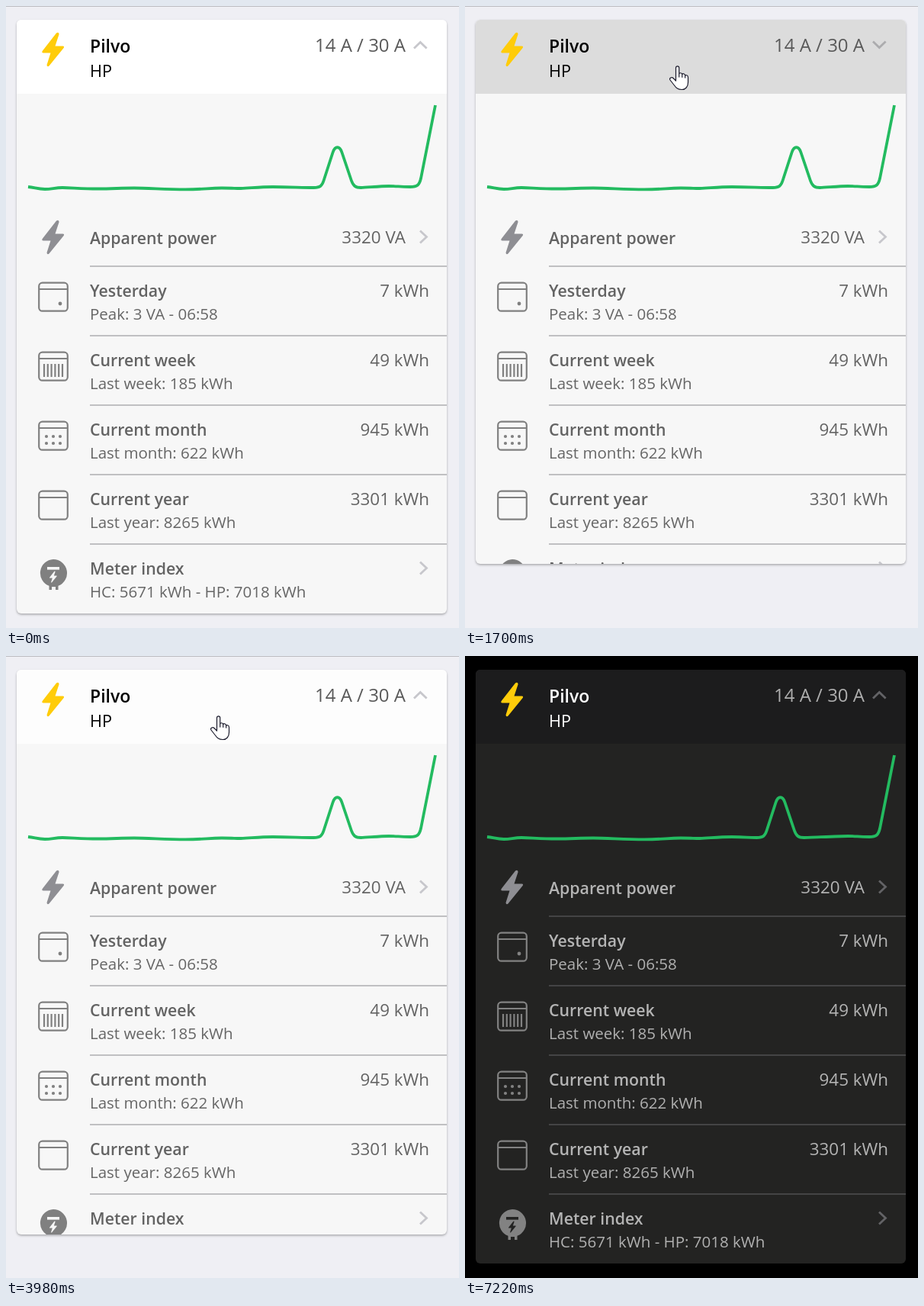
Write an HTML page that moves like this. It is 594x815 px and loops after 8 s.

```html
<!DOCTYPE html>
<html lang="en">
<head>
<meta charset="utf-8">
<title>Energy meter card</title>
<style>
  html, body { margin: 0; width: 100%; height: 100%; overflow: hidden; }
  body {
    --page: #efeff4; --edge: #bdbdc1; --head: #fff; --body: #f7f7f7;
    --strong: #000; --value: #595959; --text: #636363; --sub: #666;
    --rule: #c0c0c2; --icon: #808080; --bolt: #8e8e93; --chev: #c7c7cc;
    background: var(--page);
  }
  body.dark {
    --page: #000; --edge: #000; --head: #1c1c1d; --body: #232322;
    --strong: #fff; --value: #aeaeae; --text: #b4b4b4; --sub: #b0b0b0;
    --rule: #444445; --icon: #828282; --chev: #636366;
  }
  #stage { position: relative; width: 594px; height: 815px; overflow: hidden; background: var(--page); }
  #stage::before { content: ""; position: absolute; width: 100%; height: 1px; background: var(--edge); }
  #card {
    position: absolute; left: 14px; top: 18px; width: 564px; height: 778px;
    overflow: hidden; border-radius: 6px; background: var(--body);
    box-shadow: 0 1.5px 3px rgba(0, 0, 0, .3);
  }
  #card svg { display: block; }
  text { font-family: "Open Sans", "Noto Sans", sans-serif; fill: var(--text); }
  .name { font-size: 23px; font-weight: 600; fill: var(--strong); }
  .tariff { font-size: 21.6px; fill: var(--strong); }
  .amps { font-size: 24px; fill: var(--value); text-anchor: end; }
  .title { font-size: 21.3px; font-weight: 600; }
  .sub { font-size: 20.5px; fill: var(--sub); }
  .value { font-size: 22.4px; text-anchor: end; }
  .rule { fill: var(--rule); }
  .line { fill: none; stroke: var(--icon); stroke-width: 2.2; }
  .solid { fill: var(--icon); }
  .chev { fill: none; stroke: var(--chev); stroke-width: 2.8; }
  #chart { fill: none; stroke: #23bb60; stroke-width: 3.8; stroke-linejoin: round; }
  #cursor { position: absolute; left: 0; top: 0; overflow: visible; }
</style>
</head>
<body>
<div id="stage">
  <div id="card">
    <svg width="564" height="778" viewBox="14 18 564 778">
      <defs>
        <path id="bolt" d="M66 35.5L47.7 59Q46.5 61.5 49 61.5H58.5L53.5 77.3Q54 80.3 56.5 78.6L75.6 55Q77 52.4 74.5 52.4H64.5L69.6 37Q69.2 33.7 66 35.5Z"/>
      </defs>
      <rect x="14" y="18" width="564" height="97" fill="var(--head)"/>
      <rect id="press" x="14" y="18" width="564" height="97"/>
      <use href="#bolt" fill="#ffcc0a"/>
      <text class="name" x="110" y="61">Pilvo</text>
      <text class="tariff" x="110" y="93">HP</text>
      <text class="amps" x="524" y="60">14 A / 30 A</text>
      <path id="toggle" class="chev"/>
      <path id="chart"/>
      <use href="#bolt" y="246" fill="var(--bolt)"/>
      <text class="title" x="110" y="312">Apparent power</text>
      <text class="value" x="524" y="311">3320 VA</text>
      <path class="chev" d="M543 294.5l8.5 8-8.5 8"/>
      <g id="rows"></g>
      <path class="chev" d="M543 728.5l8.5 8-8.5 8"/>
      <g>
        <path class="solid" d="M62 725a18 18 0 0 1 6.5 34.8V765H65V761H60V765H56.5V759.8A18 18 0 0 1 62 725Z"/>
        <rect x="54" y="735" width="16" height="3.6" fill="var(--body)"/>
        <use href="#bolt" fill="var(--body)" transform="translate(62 748) scale(.34) translate(-62 -57)"/>
      </g>
    </svg>
  </div>
  <svg id="cursor" width="26" height="33">
    <path fill="#fff" stroke="#1b1b2c" stroke-width="1.2" stroke-linejoin="round"
      d="M8.5 20V3A2.1 2.1 0 0 1 12.7 3V11.5C13 9 16.5 9.3 16.7 11.8C17 10 20.5 10.4 20.6 13.2C21.3 12 24.5 12.5 24.5 15.5V22C24.5 28 21 31.5 16.5 31.5C11 31.5 9 29.5 6.5 26L1 19C-.5 16.5 3 14.5 5 16.5ZM12.7 11v4.5M16.7 11.8v4M20.6 13.2v3.4"/>
  </svg>
</div>
<script>
const $ = id => document.getElementById(id);
const LOOP = 8000, CLOSED = 97, OPEN = 778;

// Rows below the chart
const bars = y => [0, 1, 2, 3, 4, 5].map(i => `<path class="line" d="M${50 + i * 4.8} ${y + 16}v17"/>`).join("");
const dots = y => [0, 1, 2, 3, 4, 5].map(i =>
  `<circle class="solid" cx="${53 + i % 3 * 9}" cy="${y + 20 + (i > 2 ? 9 : 0)}" r="2.1"/>`).join("");
const rows = [
  ["Yesterday", "Peak: 3 VA - 06:58", "7 kWh", y => `<circle class="solid" cx="71" cy="${y + 28}" r="2.4"/>`],
  ["Current week", "Last week: 185 kWh", "49 kWh", bars],
  ["Current month", "Last month: 622 kWh", "945 kWh", dots],
  ["Current year", "Last year: 8265 kWh", "3301 kWh", () => ""],
  ["Meter index", "HC: 5671 kWh - HP: 7018 kWh", "", null]
];
$("rows").innerHTML = rows.map(([title, sub, value, mark], i) => {
  const y = 341 + i * 91, top = y + 21;
  const icon = mark
    ? `<rect class="line" x="43.2" y="${top + .7}" width="37.6" height="37" rx="4.5"/>
       <path class="line" d="M43 ${top + 9}h38"/>${mark(top)}` : "";
  return `<rect class="rule" x="110" y="${y - 1}" width="468" height="2"/>${icon}
    <text class="title" x="110" y="${y + 40}">${title}</text>
    <text class="sub" x="110" y="${y + 70}">${sub}</text>
    <text class="value" x="555" y="${y + 40}">${value}</text>`;
}).join("");

// Load curve with its peak at x = p
const curve = p => `M29 237C38 238 42 240 51 240S64 238 74 238S100 239.5 120 239.5
  S150 238.5 168 238.5S210 240.3 235 240.3S265 238.5 283 238.5S297 239 308 239
  S330 237 350 237S${p - 46} 238 ${p - 31} 238C${p - 22} 238 ${p - 20} 235 ${p - 18} 229
  L${p - 6} 192C${p - 3} 183 ${p + 3} 183 ${p + 6} 192L${p + 18.5} 229
  C${p + 21} 236 ${p + 24} 238 ${p + 31} 238S490 236 502 236S515 237 530 237
  C540 237 542 234 544 226L563 130`;

const clamp = v => Math.min(1, Math.max(0, v));
const hold = (t, from, step) => from + Math.floor((t - from) / step) * step;

// CSS "ease": cubic-bezier(.25, .1, .25, 1)
function ease(x) {
  if (x <= 0 || x >= 1) return clamp(x);
  const at = (a, b, s) => 3 * a * s * (1 - s) ** 2 + 3 * b * s * s * (1 - s) + s ** 3;
  let lo = 0, hi = 1;
  for (let i = 0; i < 24; i++) {
    const mid = (lo + hi) / 2;
    if (at(.25, .25, mid) < x) lo = mid; else hi = mid;
  }
  return at(.1, 1, lo);
}

function moveCursor(t) {
  const visible = t >= 500 && t < 6010;
  $("cursor").style.display = visible ? "" : "none";
  if (!visible) return;
  let x = 268, y = 78;
  if (t < 1160) {
    const k = (1 - clamp((hold(t, 500, 66) - 500) / 660)) ** 2;
    x += 215 * k;
    y += 672 * k;
  } else if (t >= 5180) {
    const k = clamp((hold(t, 5180, 69.1) - 5110) / 829) ** 1.6;
    x += 308 * k;
    y += 725 * k;
  }
  $("cursor").style.transform = `translate(${x}px, ${y}px)`;
}

function render(t) {
  const dark = t >= 7220;
  const shut = t >= 1630 && t < 3770;
  const closing = t < 1630 ? 0 : ease((hold(t, 1630, 72.5) - 1600) / 300);
  const opening = t < 3770 ? 0 : ease((hold(t, 3770, 70) - 3768) / 300);

  let press = 0;
  if (t >= 3700) press = 1 - opening;
  else if (t >= 1490) press = 1 - closing;

  document.body.classList.toggle("dark", dark);
  $("card").style.height = OPEN - (OPEN - CLOSED) * (closing - opening) + "px";
  $("press").setAttribute("fill-opacity", .15 * press);
  $("toggle").setAttribute("d", shut ? "M535 46.5l8.3 8 8.3-8" : "M535 55.5l8.3-8 8.3 8");
  $("toggle").style.stroke = press > .5 ? "#acacae" : "";
  $("chart").setAttribute("d", curve(dark ? 413.5 : 434.5));
  moveCursor(t);
}

const start = performance.now();
function tick() {
  render((performance.now() - start) % LOOP);
  requestAnimationFrame(tick);
}
tick();
</script>
</body>
</html>
```
